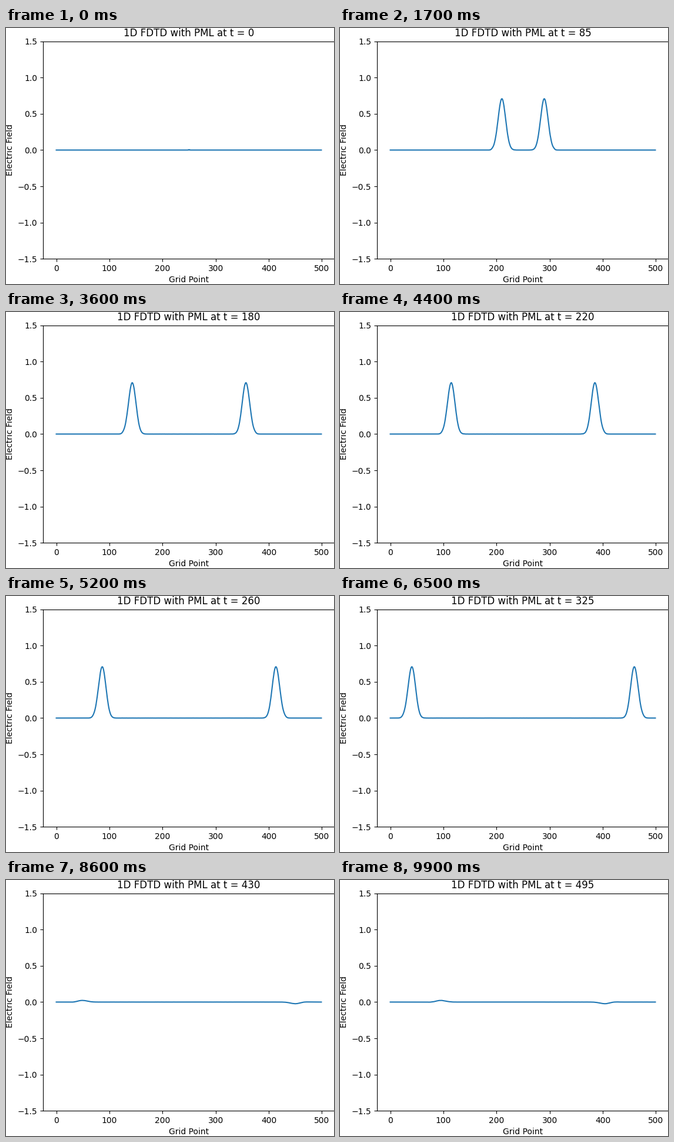
Write a matplotlib script that moves like this. It is 558x435 px and loops after 10000 ms.

```python
import numpy as np
import matplotlib.pyplot as plt
from matplotlib.animation import FuncAnimation

# Stage
WIDTH, HEIGHT, DPI = 558, 435, 100
FRAMES, INTERVAL, STRIDE = 100, 100, 5

# Grid and pulse
SIZE, SRC = 500, 250
COURANT = 1 / np.sqrt(2)
T0, SPREAD = 30, 10

# Absorbing layer
PML_WIDTH, PML_ORDER, SIGMA_MAX = 16, 3, 0.44


def pml_profile():
    i = np.arange(SIZE)
    edge = np.minimum(i, SIZE - 1 - i)
    depth = np.clip((PML_WIDTH - edge) / PML_WIDTH, 0, 1)
    return SIGMA_MAX * depth ** PML_ORDER


def simulate():
    """Return the electric field at every STRIDE-th time step."""
    loss = pml_profile() / 2
    keep = (1 - loss) / (1 + loss)
    gain = COURANT / (1 + loss)
    ez, hy = np.zeros(SIZE), np.zeros(SIZE)
    fields = []
    for t in range((FRAMES - 1) * STRIDE + 1):
        ez[SRC] += np.exp(-0.5 * ((t - T0) / SPREAD) ** 2)
        hy[:-1] = keep[:-1] * hy[:-1] + gain[:-1] * np.diff(ez)
        ez[1:] = keep[1:] * ez[1:] + gain[1:] * np.diff(hy)
        if t % STRIDE == 0:
            fields.append(ez.copy())
    return fields


fields = simulate()

# The tiny margin keeps the pixel size from being truncated
fig = plt.figure(figsize=((WIDTH + 1e-6) / DPI, (HEIGHT + 1e-6) / DPI),
                 dpi=DPI, facecolor="white")
ax = fig.add_axes([63 / WIDTH, 42.8 / HEIGHT, 496 / WIDTH, 369.6 / HEIGHT])
line, = ax.plot(np.arange(SIZE), fields[0])
ax.set_ylim(-1.5, 1.5)
ax.set_xlabel("Grid Point")
ax.set_ylabel("Electric Field")
title = ax.set_title("")


def update(frame):
    line.set_ydata(fields[frame])
    title.set_text(f"1D FDTD with PML at t = {frame * STRIDE}")
    return line, title


anim = FuncAnimation(fig, update, frames=FRAMES, interval=INTERVAL,
                     repeat=True, repeat_delay=0, blit=False)
plt.show()
```
